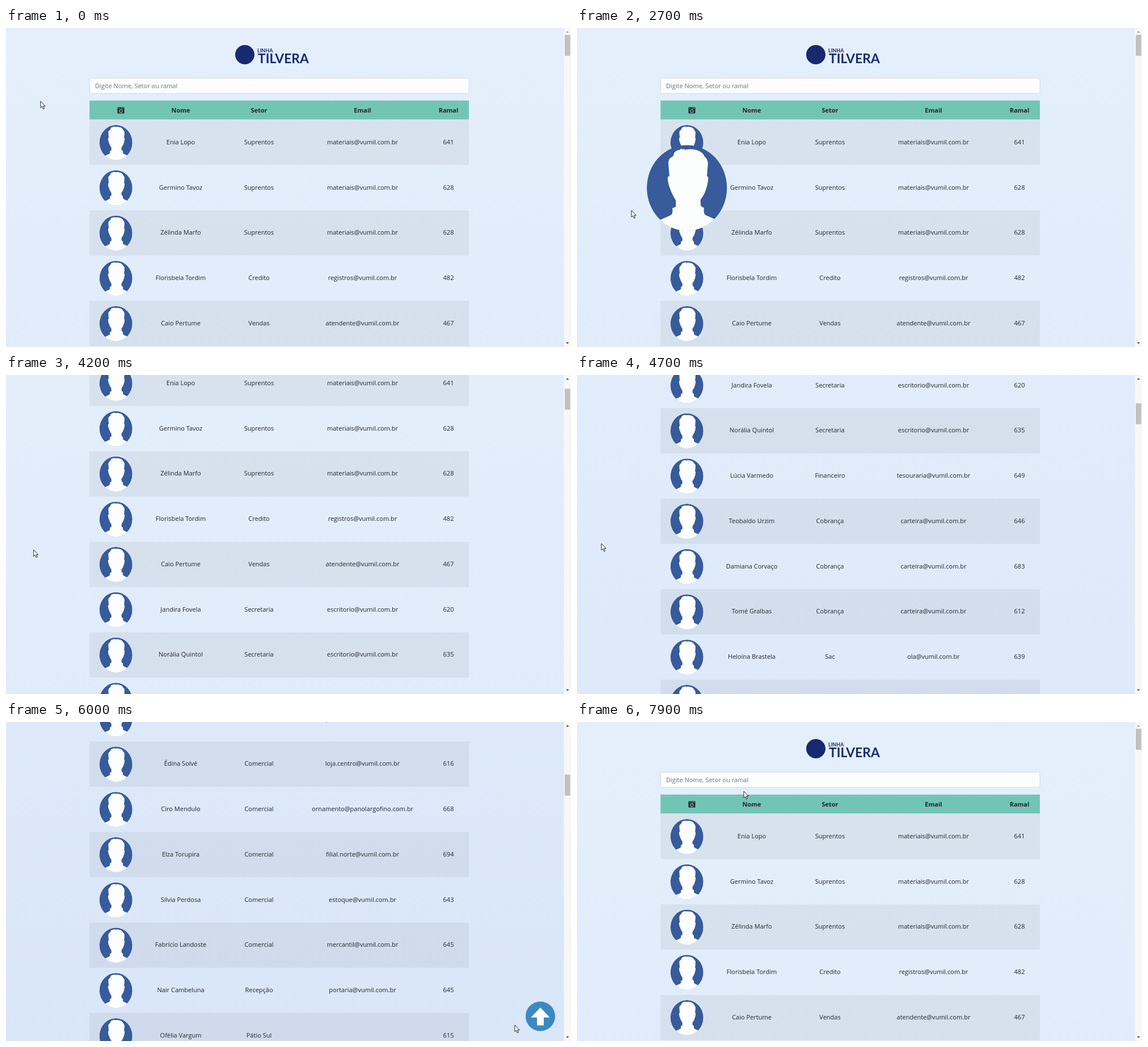
Recreate the animation shown at these times as an HTML page. Size 996 by 562 pixels, loop 8000 ms.

```html
<!DOCTYPE html>
<html lang="pt">
<head>
<meta charset="utf-8">
<title>Lista de ramais</title>
<style>
  html, body { margin: 0; width: 100%; height: 100%; overflow: hidden; background: #e3eefb; }
  svg { display: block; }
  text { font: 11px "Open Sans", "Noto Sans", sans-serif; fill: #212529; }
  .mid text { text-anchor: middle; }
  .head text { font-weight: 700; }
  .logo text { font-family: Lato, sans-serif; font-weight: 700; fill: #17296f; }
</style>
</head>
<body>
<svg id="stage" width="996" height="562" viewBox="0 0 996 562">
  <defs>
    <linearGradient id="sky" gradientUnits="userSpaceOnUse" x1="0" y1="0" x2="0" y2="1900">
      <stop offset="0" stop-color="#e4effb"/>
      <stop offset="1" stop-color="#d9e6f8"/>
    </linearGradient>
    <clipPath id="oval"><ellipse rx="112.5" ry="120"/></clipPath>
    <g id="avatar" clip-path="url(#oval)">
      <ellipse rx="112.5" ry="120" fill="#375b9b"/>
      <path fill="#fcfdfd" d="M-49-33L-52-68Q-52-82-43-86Q-37-88-36-98Q-32-105-19-107L-17-110L-9-106L-13-110L-4-107
        Q10-110 27-106Q46-100 49-88Q58-82 59-68L56-32Q60-33 60-26Q58-8 54 2Q50 18 38 33L39 51L48 56Q46 72 52 76L79 88
        V125H-76V90L-46 77Q-38 72-41 57L-31 53V35Q-43 16-47 2Q-53-10-54-28Q-53-33-49-33Z"/>
    </g>
  </defs>

  <g id="page">
    <rect width="996" height="2600" fill="url(#sky)"/>
    <g class="logo">
      <circle cx="421" cy="47" r="17" fill="#17296f"/>
      <text x="443" y="43" style="font-size:9px">LINHA</text>
      <text x="444" y="62" style="font-size:22.8px">TILVERA</text>
    </g>
    <rect x="147.5" y="88.3" width="668.6" height="26.8" rx="3" fill="#fcfdfd" stroke="#ced4da" stroke-width=".8"/>
    <text x="157" y="106" style="fill:#6c757d">Digite Nome, Setor ou ramal</text>
    <rect x="147.2" y="127.8" width="668.8" height="33.4" fill="#72c5b5"/>
    <g id="camera" fill="none" stroke="#212529">
      <rect x="196.5" y="139.5" width="12" height="11" rx="1" fill="#212529" stroke="none"/>
      <path d="M197.5 141.2h3M202 141.2h5.5" stroke="#72c5b5" stroke-width=".9"/>
      <circle cx="202.5" cy="146.3" r="2.6" stroke="#72c5b5" stroke-width="1.2"/>
    </g>
    <g id="head" class="mid head"></g>
    <g id="rows" class="mid"></g>
    <use id="zoom" href="#avatar"/>
  </g>

  <g id="up">
    <circle cx="942" cy="518.5" r="26" fill="#3b88c3"/>
    <path d="M942 503L958.5 520.5H948V534.5H936V520.5H925.5Z" fill="#fff"/>
  </g>

  <g id="scrollbar">
    <rect x="983.5" width="12.5" height="562" fill="#f7f7f7"/>
    <path id="arrowUp" d="M987 8.2L989.8 5.2L992.6 8.2Z" fill="#505050"/>
    <path d="M987 553.8L989.8 556.8L992.6 553.8Z" fill="#505050"/>
    <rect id="thumb" x="985" y="12" width="9.7" height="37" fill="#c1c1c1"/>
  </g>

  <g id="status">
    <path d="M-1 546.5H70Q73 546.5 73 549.5V563H-1Z" fill="#fff" stroke="#c8ccd2"/>
    <text x="4" y="557.5" style="font-size:8.3px;fill:#6b6f75">intramesa:4210/#</text>
  </g>

  <g id="pointer" fill="#fff" stroke="#111" stroke-linejoin="round">
    <path id="arrow" d="M0 0V11.6L2.7 9.2L4.6 13.7L6.5 12.9L4.6 8.6H8.2Z" stroke-width=".9"/>
    <path id="hand" d="M-1.2 8V1.2Q0-.6 1.2 1.2V5.5Q2.6 4.6 3.4 6Q4.8 5.2 5.4 6.6Q7 6 7.2 7.8V11Q7 13.5 5.6 15.5H-.2Q-2 12.5-4.6 9.8Q-4.2 7.6-2.2 9.2Z"/>
  </g>
</svg>

<script>
const LOOP = 8000, STEP = 100;
const ROW_TOP = 161.75, ROW_H = 79.75, AVATAR_X = 193.75, AVATAR_Y = 40.2;
const SMALL = 58 / 225, COLUMNS = [308, 446, 628.5, 780];
const $ = id => document.getElementById(id);

const MAIL = '@vumil.com.br';
const PEOPLE = [
  ['Enia Lopo', 'Suprentos', 'materiais', 641],
  ['Germino Tavoz', 'Suprentos', 'materiais', 628],
  ['Zélinda Marfo', 'Suprentos', 'materiais', 628],
  ['Florisbela Tordim', 'Credito', 'registros', 482],
  ['Caio Pertume', 'Vendas', 'atendente', 467],
  ['Jandira Fovela', 'Secretaria', 'escritorio', 620],
  ['Norália Quintol', 'Secretaria', 'escritorio', 635],
  ['Lúcia Varmedo', 'Financeiro', 'tesouraria', 649],
  ['Teobaldo Urzim', 'Cobrança', 'carteira', 646],
  ['Damiana Corvaço', 'Cobrança', 'carteira', 683],
  ['Tomé Gralbas', 'Cobrança', 'carteira', 612],
  ['Heloína Brastela', 'Sac', 'ola', 639],
  ['Dario Plumesa', 'Sac', 'ola', 652],
  ['Ivone Castrul', 'Comercial', 'pracaleste', 674],
  ['Édina Solvé', 'Comercial', 'loja.centro', 616],
  ['Ciro Mendulo', 'Comercial', 'ornamento@panolargofino.com.br', 668],
  ['Elza Torupira', 'Comercial', 'filial.norte', 694],
  ['Sílvia Perdosa', 'Comercial', 'estoque', 643],
  ['Fabrício Landoste', 'Comercial', 'mercantil', 645],
  ['Nair Cambeluna', 'Recepção', 'portaria', 645],
  ['Ofélia Vargum', 'Pátio Sul', '', 615],
  ['Rui Andelmo', 'Pátio Sul', '', 618],
];

// Each key is [time, ...values].
const POINTER = [[800, 61, 129], [1200, 35, 178], [1700, 174, 281], [2400, 174, 281], [2800, 70, 335],
  [3000, 72, 350], [3200, 168, 430], [3500, 180, 440], [3600, 180, 440], [4000, 60, 330], [4300, 43, 297],
  [5400, 43, 297], [6000, 897, 534], [6400, 928, 518], [7300, 928, 518], [7900, 294, 122]];
const WHEEL = [[4000, 0], [4600, 560], [4700, 582], [4800, 600], [5300, 1244]];
const UP_ALPHA = [[4900, 0], [5200, 1], [6400, 1], [6600, .56], [7100, .56], [7300, 0]];
const ZOOMS = [
  { row: 1, keys: [[1700, 0], [2200, 1], [2500, 1], [2900, 0]] },
  { row: 3, keys: [[3100, 0], [3500, 1], [3700, 1], [4100, 0]] },
];
const HELD = [2300, 2400, 3000, 3600, 5400, 6200, 7000];

const smooth = p => { p = Math.min(1, Math.max(0, p)); return p * p * (3 - 2 * p); };

function track(keys, t) {
  const next = keys.findIndex(k => k[0] > t);
  if (next < 0) return keys[keys.length - 1].slice(1);
  if (next === 0) return keys[0].slice(1);
  const a = keys[next - 1], b = keys[next], p = (t - a[0]) / (b[0] - a[0]);
  return a.slice(1).map((v, i) => v + (b[i + 1] - v) * p);
}

const cells = (values, y) =>
  values.map((v, i) => `<text x="${COLUMNS[i]}" y="${y}">${v}</text>`).join('');

const address = user => !user || user.includes('@') ? user : user + MAIL;

$('head').innerHTML = cells(['Nome', 'Setor', 'Email', 'Ramal'], 149);
$('rows').innerHTML = PEOPLE.map(([name, area, user, ext], i) => `
  <g transform="translate(0 ${ROW_TOP + i * ROW_H})">
    <rect x="147.2" width="668.8" height="${ROW_H}"/>
    <use href="#avatar" transform="translate(${AVATAR_X} ${AVATAR_Y}) scale(${SMALL})"/>
    ${cells([name, area, address(user), ext], 43)}
  </g>`).join('');
const stripes = [...$('rows').querySelectorAll('rect')];

const show = (id, on) => $(id).setAttribute('visibility', on ? 'visible' : 'hidden');
const move = (id, value) => $(id).setAttribute('transform', value);

function draw(t) {
  const [x, y] = track(POINTER, t);
  const scroll = Math.round(track(WHEEL, t)[0] * (1 - smooth((t - 6600) / 689)));
  const inside = x > 147 && x < 816;
  const hovered = inside ? Math.floor((y + scroll - ROW_TOP) / ROW_H) : -1;
  stripes.forEach((s, i) =>
    s.setAttribute('fill-opacity', i === hovered ? .075 : i % 2 ? 0 : .05));

  const active = ZOOMS.find(z => track(z.keys, t)[0] > 0);
  show('zoom', active);
  if (active) {
    const size = SMALL + (1 - SMALL) * smooth(track(active.keys, t)[0]);
    move('zoom', `translate(${AVATAR_X} ${ROW_TOP + active.row * ROW_H + AVATAR_Y}) scale(${size})`);
  }

  move('page', `translate(0 ${-scroll})`);
  move('thumb', `translate(0 ${scroll / 15.4})`);
  $('arrowUp').setAttribute('fill', scroll > 0 ? '#505050' : '#a3a3a3');
  $('up').setAttribute('opacity', track(UP_ALPHA, t)[0]);

  const linked = t >= 6400 && t <= 7300;
  show('hand', linked);
  show('arrow', !linked);
  show('status', t >= 6500 && t <= 7300);
  move('pointer', `translate(${x} ${y})`);
}

function frame() {
  let t = Math.floor(performance.now() % LOOP / STEP) * STEP;
  while (HELD.includes(t)) t -= STEP;
  draw(t);
  requestAnimationFrame(frame);
}
frame();
</script>
</body>
</html>
```
